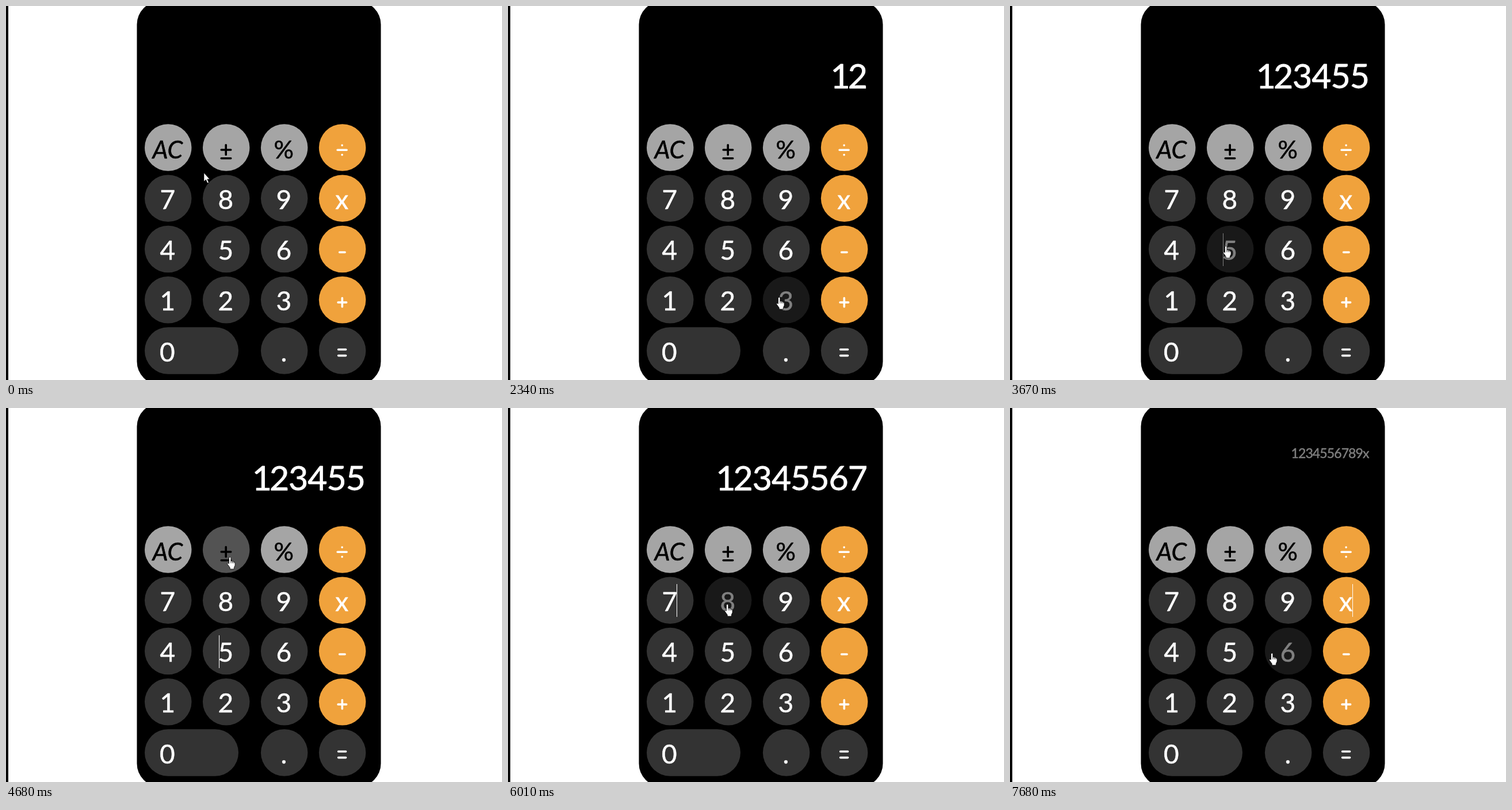
An HTML page for the animation above (8000 ms loop, 862 by 650 pixels).

```html
<!DOCTYPE html>
<html lang="en">
<head>
<meta charset="utf-8">
<title>Calculator</title>
<style>
  html, body { margin: 0; width: 100%; height: 100%; overflow: hidden; background: #fff; }
  svg { display: block; width: 862px; height: 650px; }
  text { font-family: Lato, "Open Sans", sans-serif; stroke-linejoin: round; }
  .key text { text-anchor: middle; font-size: 46px; stroke-width: .5; }
  .icon { fill: none; stroke-linecap: round; stroke-width: 3.6; }
  #main { font-size: 59px; letter-spacing: -1px; text-anchor: end; fill: #fff; stroke: #fff; stroke-width: .8; }
  #past { font-size: 23px; letter-spacing: -.9px; text-anchor: end; fill: #7f7f7f; stroke: #7f7f7f; stroke-width: .5; }
</style>
</head>
<body>
<svg id="stage" viewBox="0 0 862 650">
  <rect width="862" height="650" fill="#fff"/>
  <rect width="4" height="650"/>
  <rect x="227.5" y="-8" width="424" height="666" rx="40"/>
  <text id="past" x="623.5" y="87"></text>
  <text id="main" x="624" y="143" dx="0 -3"></text>
  <g id="keys"></g>
  <path id="arrow" d="M0 0V15l3.4-3.2 2.6 6 2.4-1-2.6-5.8H10z" fill="#fff" stroke="#000" stroke-width=".6"/>
  <g id="hand" stroke="#000" stroke-width=".8" stroke-linejoin="round">
    <path fill="#fff" d="M3.5 2.2q1.8-2.4 3.4 0V8.2q1.6-1 2.6.6q1.6-.8 2.4.7q2.2-.2 2.2 2v4l-1.8 4V22H5.2V19.5L.6 13q.4-2.4 2.9-.6z"/>
    <path fill="none" d="M6.9 8.2v3.6M9.5 8.8v3M11.9 9.5v2.5"/>
  </g>
</svg>
<script>
const NS = 'http://www.w3.org/2000/svg';
const $ = id => document.getElementById(id);

function add(parent, tag, attrs, content) {
  const el = document.createElementNS(NS, tag);
  for (const name in attrs) el.setAttribute(name, attrs[name]);
  if (content) el.textContent = content;
  parent.appendChild(el);
  return el;
}

// Operator icons, relative to the key centre
const ICONS = {
  '±': 'M-8.5 4H8M-.5-4.5V12.5M-8.5 18.8H8',
  '÷': 'M-8.5 4.2H7.5M-.5-4V-3.9M-.5 12.6V12.7',
  '-': 'M-5 5.5H4.5',
  '+': 'M-7.5 4.4H7M-.3-3.2V12',
  '=': 'M-7-2H6M-7 8.6H6'
};
const ROWS = ['AC ± % ÷', '7 8 9 x', '4 5 6 -', '1 2 3 +', '0 _ . ='];
const keys = {};

function addKey(label, col, row) {
  const cx = 281.75 + 100.95 * col, cy = 246 + 88.25 * row, r = 40.75;
  const gray = row === 0 && col < 3;
  const orange = col === 3 && row < 4;
  const ink = gray ? '#000' : '#fff';
  const g = add($('keys'), 'g', { class: 'key' });
  add(g, 'rect', {
    x: cx - r, y: cy - r, width: label === '0' ? 163 : 2 * r, height: 2 * r, rx: r,
    fill: gray ? '#a5a5a5' : orange ? '#f0a23c' : '#333'
  });
  if (ICONS[label]) {
    add(g, 'path', { class: 'icon', d: ICONS[label], stroke: ink, transform: `translate(${cx} ${cy})` });
  } else {
    const t = add(g, 'text', { x: cx - .8, y: cy + 18.5, fill: ink, stroke: ink }, label);
    if (label === '0') t.setAttribute('x', cx - 1.5);
    if (gray) t.style.fontSize = '43px';
    if (label === 'AC') t.style.fontStyle = 'italic';
  }
  keys[label] = { g, cx, cy };
}

ROWS.forEach((row, j) => row.split(' ').forEach((label, i) => {
  if (label !== '_') addKey(label, i, j);
}));
const caret = add($('keys'), 'path', { stroke: '#fff', 'stroke-width': 1 });

// Pointer x, y, hovered key, digits entered, caret key and side
const TYPED = '1234556789';
const STEPS = [
  [344, 290, '', 0, ''],
  [327, 432, '', 0, ''],
  [276, 542, '1', 0, ''],
  [277, 532, '1', 0, ''],
  [281, 515, '1', 1, '1>'],
  [362, 515, '2', 1, ''],
  [372, 513, '2', 2, '2<'],
  [466, 505, '3', 2, ''],
  [472, 508, '3', 3, '3<'],
  [283, 428, '4', 4, '4>'],
  [366, 420, '5', 4, ''],
  [370, 416, '5', 6, '5<'],
  [465, 412, '6', 6, ''],
  [474, 336, '9', 6, ''],
  [384, 258, '±', 6, '5<'],
  [474, 330, '9', 6, ''],
  [484, 381, '6', 7, '6>'],
  [286, 342, '7', 7, ''],
  [376, 340, '8', 8, '7>'],
  [466, 338, '9', 9, '8>'],
  [474, 340, '9', 10, '9<'],
  [584, 340, 'x', 10, ''],
  [590, 334, 'x', 10, ''],
  [450, 425, '6', 0, 'x>']
];
const LOOP = 8000;
const startOf = i => Math.round(33.4 * i) * 10;

function placeCaret(spot) {
  caret.style.display = spot ? '' : 'none';
  if (!spot) return;
  const { g, cx, cy } = keys[spot[0]];
  const shift = spot[1] === '<' ? -12.25 : spot[0] === '1' ? 8.25 : 11.25;
  caret.setAttribute('d', `M${Math.floor(cx + shift) + .5} ${Math.round(cy) - 28}v57`);
  g.appendChild(caret);
}

let shown = -1;
function draw(time) {
  let i = STEPS.length - 1;
  while (startOf(i) > time) i--;
  if (i === shown) return;
  shown = i;
  const [x, y, hover, count, spot] = STEPS[i];
  for (const label in keys) keys[label].g.setAttribute('opacity', label === hover ? .5 : 1);
  placeCaret(spot);
  $('main').textContent = TYPED.slice(0, count);
  $('past').textContent = i === STEPS.length - 1 ? TYPED + 'x' : '';
  for (const id of ['arrow', 'hand']) {
    $(id).setAttribute('transform', `translate(${x} ${y})`);
    $(id).style.display = (id === 'hand') === !!hover ? '' : 'none';
  }
}

const begin = performance.now();
function tick() {
  draw((performance.now() - begin) % LOOP);
  requestAnimationFrame(tick);
}
tick();
</script>
</body>
</html>
```
